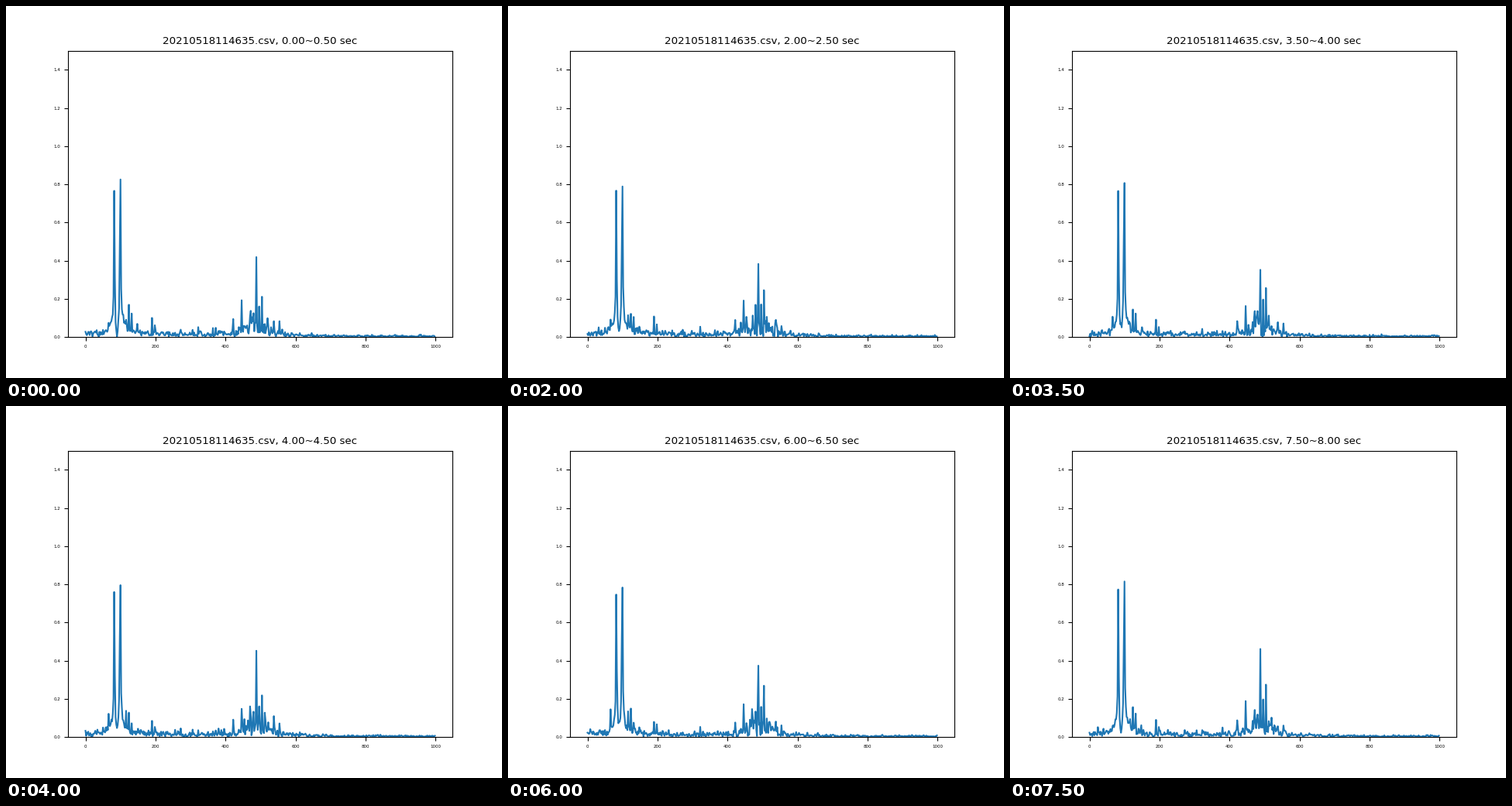
Animation, 640 px wide and 480 px high, one loop 8 s. Source, as a matplotlib script:

```python
import numpy as np
import matplotlib.pyplot as plt
from matplotlib.animation import FuncAnimation

FRAMES, WINDOW = 16, 0.5
BASE = 8.265  # Hz, spacing of the harmonics
FREQ = np.arange(0, 1000, 1 / WINDOW)
ORDER = np.arange(1, 122)

# Strong harmonics; all others get a random amplitude
STRONG = {8: .12, 10: .88, 12: 1.05, 14: .09, 15: .12, 16: .10, 18: .06,
          23: .09, 54: .19, 57: .15, 58: .14, 59: .40, 60: .15, 61: .27,
          62: .12, 65: .09}


def envelope(f, floor, low, hill):
    """Floor, plus a step up below 650 Hz, plus a hill at 490 Hz."""
    step = 1 / (1 + np.exp((f - 650) / 30))
    return floor + low * step + hill * np.exp(-((f - 490) / 50) ** 2)


rng = np.random.default_rng(7)
amp = envelope(ORDER * BASE, .004, .019, .03) * rng.gamma(2, .5, ORDER.size)
phase = rng.uniform(0, 2 * np.pi, ORDER.size)
for k, a in STRONG.items():
    amp[k - 1] = a
phase[[9, 11]] = 0

# Each tone leaks into the neighbouring bins of its rectangular window
leak = amp * np.sinc((FREQ[:, None] - ORDER * BASE) * WINDOW)
sigma = envelope(FREQ, .0035, .005, .025)


def spectrum(i):
    turn = 2 * np.pi * BASE * ORDER * i * WINDOW + phase
    noise = np.random.default_rng(100 + i).normal(size=(2, FREQ.size)) * sigma
    return np.abs(leak @ np.exp(1j * turn) + noise[0] + 1j * noise[1])


plt.rcParams.update({"font.family": "DejaVu Sans", "font.size": 8,
                     "xtick.labelsize": 4, "ytick.labelsize": 4})
fig, ax = plt.subplots(figsize=(6.4, 4.8), dpi=100)
line, = ax.plot(FREQ, spectrum(0), color="#1f77b4", lw=1.5)
title = ax.set_title("")
ax.set_ylim(0, 1.5)


def update(i):
    t = i * WINDOW
    line.set_ydata(spectrum(i))
    title.set_text(f"20210518114635.csv, {t:.2f}~{t + WINDOW:.2f} sec")
    return line, title


anim = FuncAnimation(fig, update, frames=FRAMES, interval=500, repeat=True,
                     repeat_delay=0)
plt.show()
```
